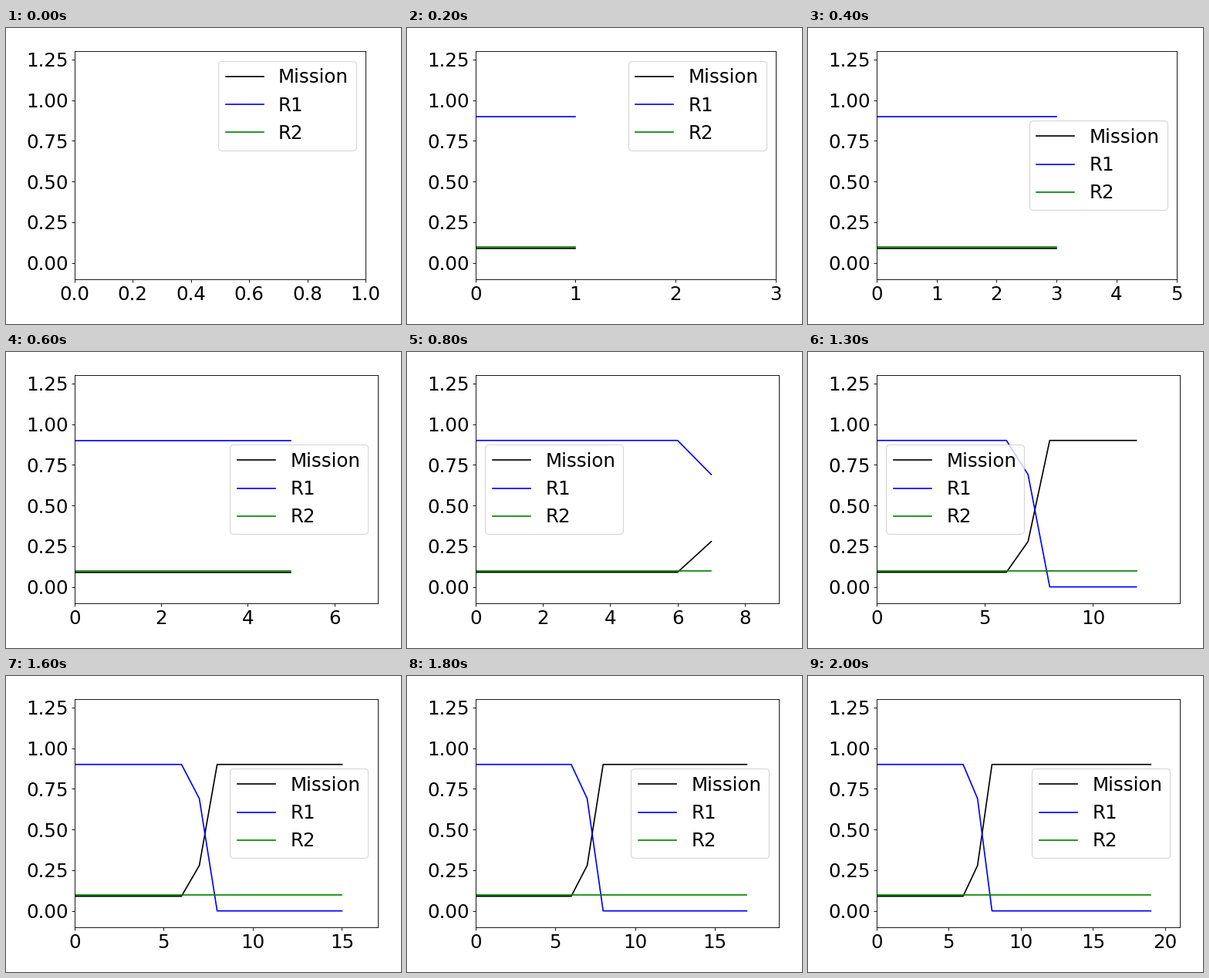
These frames come from a looping animation (512x384 px, 2100 ms). A matplotlib script:

```python
import numpy as np
import matplotlib.pyplot as plt
from matplotlib.animation import FuncAnimation

STEPS = 21

plt.rcParams["font.size"] = 22
plt.rcParams["font.family"] = "DejaVu Sans"

time = np.arange(STEPS)
r1 = np.where(time < 7, 0.9, 0.0)
r1[7] = 0.69  # R1 degrades, then fails
r2 = np.full(STEPS, 0.1)
mission = 0.9 * (1 - r1)
series = [("Mission", mission, "k"), ("R1", r1, "b"), ("R2", r2, "g")]

fig, ax = plt.subplots(figsize=(6.4, 4.8), dpi=80)


def fit_layout():
    # Reserve room for ticks on all four sides, but show only two
    ax.tick_params(top=True, right=True)
    fig.tight_layout()
    ax.tick_params(top=False, right=False)


def draw(i):
    ax.clear()
    for label, values, color in series:
        ax.plot(time[:i], values[:i], color=color, label=label)
    ax.set_xlim(0, i + 1)
    ax.set_ylim(-0.1, 1.3)
    ax.legend(loc="best")
    fit_layout()
    return ax.lines


anim = FuncAnimation(fig, draw, frames=STEPS, interval=100,
                     repeat=True, repeat_delay=0, blit=False)
plt.show()
```
